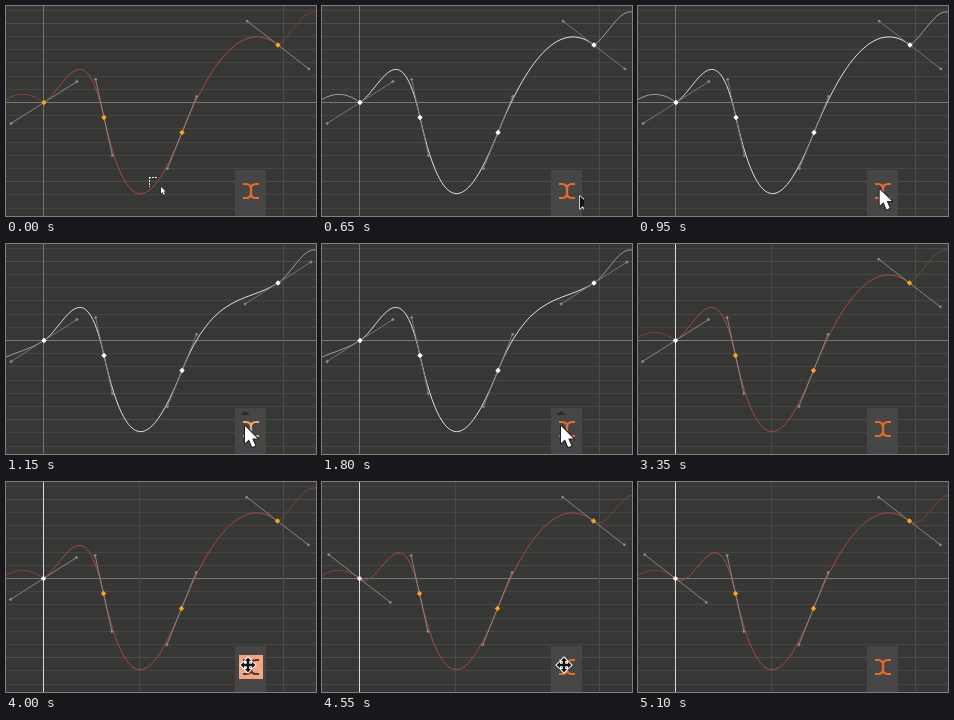
An HTML page with a canvas for the animation above (5400 ms loop, 310x210 px).

```html
<!DOCTYPE html>
<html lang="en">
<head>
<meta charset="utf-8">
<title>Cyclic curve tangents</title>
<style>
html, body { margin: 0; width: 100%; height: 100%; overflow: hidden; background: #373735; }
canvas { display: block; width: 310px; height: 210px; }
</style>
</head>
<body>
<canvas id="stage" width="310" height="210"></canvas>
<script>
const W = 310, H = 210, LOOP = 5400, STEP = 50;
const main = document.getElementById('stage').getContext('2d');
const layer = document.createElement('canvas');
layer.width = W;
layer.height = H;
const over = layer.getContext('2d');

const KEYS = [[38, 96.5], [98, 111.5], [176, 126.5], [272, 39]];
const START = -0.636, END = 0.774;
const PERIOD = [KEYS[3][0] - KEYS[0][0], KEYS[3][1] - KEYS[0][1]];
const HANDLE = 39;

const red = { curve: '#aa4653', key: '#ffa21c', first: '#ffa21c', handle: '#858585' };
const white = { curve: '#dedede', key: '#fff', first: '#fff', handle: '#757575' };
const slopes = (a, b) => [a, 4.53, -2.48, b];

const open = { ...red, slopes: slopes(START, END) };
const selected = { ...white, slopes: slopes(START, END) };
const endMatched = { ...white, slopes: slopes(START, START) };
const firstOnly = { ...open, first: '#fff', playhead: true };
const startMatched = { ...firstOnly, slopes: slopes(END, END) };

const clamp = v => Math.max(0, Math.min(1, v));
const lerp = (a, b, p) => a + (b - a) * p;
const ramp = (t, from, to) => clamp((t - from) / (to - from));

function line(c, x1, y1, x2, y2, color) {
  c.strokeStyle = color;
  c.beginPath();
  c.moveTo(x1, y1);
  c.lineTo(x2, y2);
  c.stroke();
}

function diamond(c, x, y, r, color) {
  c.fillStyle = color;
  c.beginPath();
  c.moveTo(x, y - r);
  c.lineTo(x + r, y);
  c.lineTo(x, y + r);
  c.lineTo(x - r, y);
  c.fill();
}

function drawGrid(c, playhead) {
  c.fillStyle = '#373735';
  c.fillRect(0, 0, W, H);
  c.lineWidth = 1;
  for (let i = -7; i <= 8; i++) {
    const y = Math.round(96 + i * 13.2) + 0.5;
    line(c, 0, y, W, y, i === 0 ? '#777775' : i % 6 ? '#454543' : '#4d4d4b');
  }
  if (playhead) line(c, 133.5, 0, 133.5, H, '#484846');
  line(c, 277.5, 0, 277.5, H, '#4c4c4a');
  line(c, 37.5, 0, 37.5, H, playhead ? '#dcdcdc' : '#737371');
}

// Hermite spline: control points sit a third of the way along each span
function drawCurve(c, tangents, dx, dy) {
  c.beginPath();
  c.moveTo(KEYS[0][0] + dx, KEYS[0][1] + dy);
  for (let i = 0; i < 3; i++) {
    const [x1, y1] = KEYS[i], [x2, y2] = KEYS[i + 1], d = (x2 - x1) / 3;
    c.bezierCurveTo(x1 + d + dx, y1 + d * tangents[i] + dy,
      x2 - d + dx, y2 - d * tangents[i + 1] + dy, x2 + dx, y2 + dy);
  }
  c.stroke();
}

function drawScene(c, s) {
  drawGrid(c, s.playhead);
  c.save();
  if (s.playhead) c.translate(-0.5, 0);
  c.strokeStyle = s.curve;
  for (const n of [-1, 0, 1]) {
    c.globalAlpha = n ? 0.6 : 1;
    drawCurve(c, s.slopes, n * PERIOD[0], n * PERIOD[1]);
  }
  c.globalAlpha = 1;
  KEYS.forEach(([x, y], i) => {
    const m = s.slopes[i], hx = HANDLE / Math.hypot(1, m), hy = hx * m;
    line(c, x - hx, y - hy, x + hx, y + hy, s.handle);
    diamond(c, x - hx, y - hy, 1.7, '#8c8c8c');
    diamond(c, x + hx, y + hy, 1.7, '#8c8c8c');
  });
  KEYS.forEach(([x, y], i) => diamond(c, x, y, 2.7, i ? s.key : s.first));
  c.restore();
}

function mix(a, b, p) {
  drawScene(main, p < 1 ? a : b);
  if (p <= 0 || p >= 1) return;
  drawScene(over, b);
  main.globalAlpha = p;
  main.drawImage(layer, 0, 0);
  main.globalAlpha = 1;
}

const ICON = new Path2D('M237 178h3q5 0 5 5v4q0 5-5 5h-3M253 178h-3q-5 0-5 5v4q0 5 5 5h3');

function drawButton(hover, pressed) {
  main.fillStyle = '#464646';
  main.fillRect(229, 164, 31, 46);
  if (pressed) {
    main.fillStyle = '#f3a585';
    main.fillRect(233, 173, 24, 24);
  }
  main.lineWidth = 2.2;
  main.strokeStyle = pressed ? '#5a3528' : hover ? '#f3a566' : '#e66a2a';
  main.stroke(ICON);
}

const ARROW = new Path2D('M0 0V16L3.7 12.6 6.6 19.5 9.6 18.2 6.7 11.5H11.5Z');
const MOVE = new Path2D('M0-7.5L3-4H1.2V-1.2H4V-3L7.5 0 4 3V1.2H1.2V4H3L0 7.5-3 4H-1.2V1.2H-4V3L-7.5 0-4-3V-1.2H-1.2V-4H-3Z');

function cursor(path, x, y, size, fill, edge, alpha = 1) {
  main.save();
  main.globalAlpha = alpha;
  main.translate(x, y);
  main.scale(size, size);
  main.lineJoin = 'round';
  main.lineWidth = 2;
  main.strokeStyle = edge;
  main.stroke(path);
  main.fillStyle = fill;
  main.fill(path);
  main.restore();
}

function drawMarquee(alpha) {
  main.save();
  main.globalAlpha = alpha;
  main.lineWidth = 1;
  main.setLineDash([2, 1]);
  line(main, 143, 171.5, 152, 171.5, '#e8e8e8');
  line(main, 143.5, 171, 143.5, 181, '#e8e8e8');
  main.restore();
  cursor(ARROW, 155, 181, 0.4, '#fff', '#222', alpha);
}

function drawScenes(t) {
  if (t < 1100) mix(open, selected, ramp(t, 0, 250));
  else if (t < 4050) mix(endMatched, firstOnly, ramp(t, 3000, 3350));
  else drawScene(main, startMatched);
}

function drawPointers(t) {
  if (t < 250) drawMarquee(1 - t / 250);
  if (t >= 650 && t < 2250) {
    const p = ramp(t, 650, 1000), out = ramp(t, 2100, 2250);
    if (t >= 1050 && t < 2150) {
      main.fillStyle = '#2c2c2c';
      main.beginPath();
      main.moveTo(234, 171);
      main.lineTo(239, 167);
      main.lineTo(244, 171);
      main.fill();
    }
    const x = lerp(258, 239, p) + 26 * out, y = lerp(190, 182, p) + 3 * out;
    main.save();
    if (t < 700) {
      main.beginPath();
      main.rect(0, 0, 262, H);
      main.clip();
    }
    cursor(ARROW, x, y, lerp(0.8, 1.08, p), t < 700 ? '#111' : '#fff', t < 700 ? '#eee' : '#222', 1 - out);
    main.restore();
  }
  if (t >= 3750 && t < 5100) {
    const p = ramp(t, 3750, 3950), out = ramp(t, 4700, 4800);
    cursor(MOVE, lerp(262, 242, p) + 7 * out, lerp(190, 183, p), 1,
      '#111', '#fff', t < 5050 ? 1 : 0.5);
  }
}

function draw(now) {
  const t = Math.floor(now % LOOP / STEP) * STEP;
  drawScenes(t);
  const pressed = t === 1050 || t === 4000;
  const hover = t >= 1000 && t < 1800 || t >= 3950 && t < 4550;
  drawButton(hover, pressed);
  drawPointers(t);
}

const begin = performance.now();
function tick() {
  draw(performance.now() - begin);
  requestAnimationFrame(tick);
}
tick();
</script>
</body>
</html>
```
